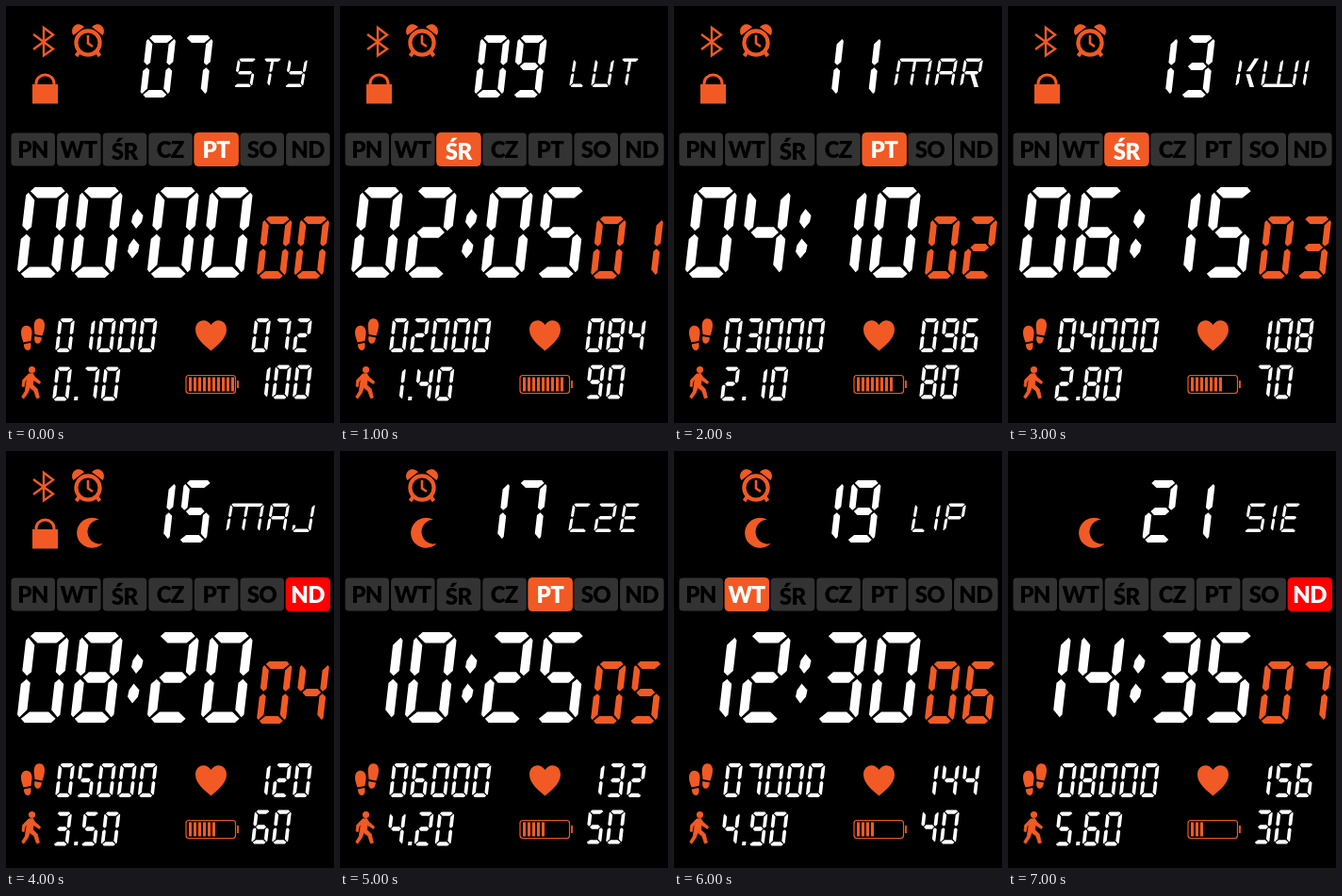
Write an HTML page that moves like this. It is 348x442 px and loops after 8 s.

```html
<!DOCTYPE html>
<html lang="pl">
<head>
<meta charset="utf-8">
<title>Watch face</title>
<style>
html, body { margin: 0; width: 100%; height: 100%; overflow: hidden; background: #000; }
svg { display: block; width: 348px; height: 442px; }
text { font: 900 24px Lato, "Open Sans", sans-serif; text-anchor: middle; letter-spacing: -.6px; }
</style>
</head>
<body>
<svg viewBox="0 0 348 442" xmlns="http://www.w3.org/2000/svg">
  <rect width="348" height="442"/>
  <g fill="none" stroke="#f15a24">
    <path id="bluetooth" stroke-width="2.400" d="M29 30L50 45.500L40 52.500V23L50 30.500L29 46"/>
    <g id="alarm">
      <circle cx="87" cy="39" r="12.600" stroke-width="4.200"/>
      <path stroke-width="2.600" d="M87 31V39.500L92 43"/>
      <path stroke-width="4" d="M78 48L74.500 53M96 48L99.500 53"/>
      <path fill="#f15a24" stroke="none" d="M71.500 31A7 7 0 0 1 83 22.200ZM102.500 31A7 7 0 0 0 91 22.200Z"/>
    </g>
    <g id="lock">
      <path stroke-width="3" d="M32 84V82A9.500 9 0 0 1 51 82V84"/>
      <rect x="28" y="83" width="27" height="20.500" fill="#f15a24" stroke="none"/>
    </g>
    <rect x="191" y="391.500" width="52.500" height="19" rx="3" stroke-width="1.200"/>
    <path stroke-width="1.800" d="M246 397V405"/>
  </g>
  <g fill="#f15a24">
    <path id="moon" d="M99 72.800A16 16 0 1 0 102.500 98A12.800 12.800 0 1 1 99 72.800Z"/>
    <path d="M16 346C16 341 19 338 23 339C27 340 28 344 27.500 348L26.500 355L18.500 356.500C17 352 16 350 16 346ZM18.800 358.500L26.300 357C27 361 26.500 364.500 23.500 365C20.500 365.300 19 362 18.800 358.500Z"/>
    <path d="M41 338C41 333.500 38 330.500 34 331.500C30 332.500 29.500 337 29.800 341L30.500 348L38.500 349.500C40 345.500 41 342 41 338ZM38 351.500L30.500 350C29.500 354 30.500 357 33 357.800C36 358.300 37.700 355 38 351.500Z"/>
    <circle cx="27.500" cy="385.500" r="3.600"/>
    <path stroke="#f15a24" stroke-width=".8" d="M24 390L28.500 389.500L30.500 393L36.700 398.500L35.400 400.500L29 396.500L28.700 401.500L33.200 406L35.400 415L32.500 416L29.700 408L25.200 404.500L23.200 410L18.700 416.200L16.700 414.300L20.200 408.500L22.200 396L20.200 398L19.200 403.500L17 403L17.700 396.500Z"/>
    <path d="M217.500 365.500C211 360 201 352.500 201 343C201 332.500 212.500 330 217.500 338C222.500 330 234 332.500 234 343C234 352.500 224 360 217.500 365.500Z"/>
    <path id="bars"/>
    <path id="seconds"/>
  </g>
  <g id="week"></g>
  <path id="digits" fill="#fff"/>
</svg>
<script>
const $ = id => document.getElementById(id);
const ORANGE = "#f15a24";
const DAYS = ["PN", "WT", "ŚR", "CZ", "PT", "SO", "ND"];
const MONTHS = ["STY", "LUT", "MAR", "KWI", "MAJ", "CZE", "LIP", "SIE"];
const WEEKDAY = [4, 2, 4, 2, 6, 4, 1, 6];
const NUMERALS = ["abcdef", "bc", "abged", "abgcd", "fgbc", "afgcd", "afgedc", "abc", "abcdefg", "abcdfg"];
const LETTERS = {
  S: "afgcd", T: "amn", Y: "fgbcd", L: "fed", U: "bcdef", M: "abcefmn", A: "abcefg",
  R: "abefgr", K: "efkr", W: "bcdefmn", I: "bc", J: "bcdj", C: "adef", Z: "abged", E: "adefg", P: "abefg"
};
const WIDTHS = { L: 16, I: 4, E: 18, M: 36, W: 36 };

// Corner points of every segment in an upright w by h cell; bars are t thick, posts v.
function segments(w, h, t) {
  const m = h / 2, g = t * .16, v = t * .86;
  const b = [[w - v * .25, t * .5], [w, t * .75], [w, m - t * .6], [w - v * .55, m - g], [w - v, m - t * .5], [w - v, t * 1.2]];
  const a = [[t * .38, t * .38], [t * .75, 0], [w - t * .75, 0], [w - t * .38, t * .38], [w - t * 1.1, t], [t * 1.1, t]];
  const flipX = p => p.map(([x, y]) => [w - x, y]);
  const flipY = p => p.map(([x, y]) => [x, h - y]);
  const mid = p => p.map(([x, y]) => [x - (w - v) / 2, y]);
  const c = flipY(b);
  const leg = [[w * .45, m + t * .4], [w * .45 + t * 1.3, m + t * .4], [w, h], [w - t * 1.3, h]];
  return {
    a, b, c, d: flipY(a), e: flipX(c), f: flipX(b),
    g: [[t * .7, m], [t * 1.2, m - t / 2], [w - t * 1.2, m - t / 2], [w - t * .7, m], [w - t * 1.2, m + t / 2], [t * 1.2, m + t / 2]],
    m: mid(b), n: mid(c), r: leg, k: flipY(leg),
    j: [[0, h * .75], [v, h * .75], [v, h - t * 1.3], [v * .25, h - t * .5], [0, h - t * .75]]
  };
}

const poly = pts => "M" + pts.map(p => p.map(n => n.toFixed(2)).join(" ")).join("L") + "Z";

function glyph(parts, x, y, { w, h, t, slant }) {
  const seg = segments(w, h, t);
  return [...parts].map(k => poly(seg[k].map(([px, py]) => [x + px + (h - py) * slant, y + py]))).join("");
}

const BIG = { w: 45.5, h: 96, t: 11.5, slant: .115, step: 57 };
const MEDIUM = { w: 31, h: 66, t: 8, slant: .115, step: 39.5 };
const SMALL = { w: 17, h: 36, t: 4.3, slant: .115, step: 21.9 };
const THIN = { w: 20, h: 30.5, t: 3.5, slant: .17, gap: 7 };

const number = (s, x, y, font) =>
  [...s].map((n, i) => glyph(NUMERALS[n], x + i * font.step, y, font)).join("");

function word(s) {
  const widths = [...s].map(c => WIDTHS[c] || THIN.w);
  let x = 281.5 - widths.reduce((sum, w) => sum + w + THIN.gap, 0) / 2;
  return [...s].map((c, i) => {
    const d = glyph(LETTERS[c], x, 55.5, { ...THIN, w: widths[i] });
    x += widths[i] + THIN.gap;
    return d;
  }).join("");
}

const pad = (n, len) => String(n).padStart(len, "0");
const show = (id, on) => $(id).setAttribute("display", on ? "inline" : "none");
const dot = (x, y) => poly([[x + 6.5, y], [x + 12.5, y + 7], [x + 11, y + 14], [x + 5, y + 21], [x, y + 14], [x + 1.5, y + 7]]);

$("week").innerHTML = DAYS.map((name, i) => {
  const x = 5.5 + i * 48.6;
  return `<rect x="${x}" y="134.5" width="46.5" height="35" rx="4"/>` +
    `<text x="${x + 23}" y="${i === 2 ? 163 : 161}">${name}</text>`;
}).join("");
const boxes = $("week").querySelectorAll("rect");
const labels = $("week").querySelectorAll("text");

function draw(k) {
  const km = pad((k + 1) * 70, 3);
  $("digits").setAttribute("d",
    number(pad(7 + 2 * k, 2), 142, 31, MEDIUM) + word(MONTHS[k]) +
    number(pad(2 * k, 2), 11, 192, BIG) + number(pad(5 * k, 2), 149, 192, BIG) +
    dot(133, 215) + dot(129, 246.5) +
    number(pad((k + 1) * 1000, 5), 52, 331, SMALL) +
    number(pad(72 + 12 * k, 3), 260, 331, SMALL) +
    number(km[0], 49, 382.5, SMALL) + number(km.slice(1), 78.5, 382.5, SMALL) +
    "M72.500 414H76.500L76 418H72Z" +
    number(String(100 - 10 * k), 260, 380.5, SMALL));
  $("seconds").setAttribute("d", number(pad(k, 2), 265.5, 223, MEDIUM));
  $("bars").setAttribute("d",
    Array.from({ length: 10 - k }, (_, i) => `M${194 + i * 5} 393.500h3v15h-3z`).join(""));
  boxes.forEach((box, i) => {
    const on = i === WEEKDAY[k];
    const color = !on ? "#333" : i === 6 ? "#f00" : ORANGE;
    box.setAttribute("fill", color);
    box.setAttribute("stroke", on ? color : "none");
    labels[i].setAttribute("fill", on ? "#fff" : "#000");
  });
  show("bluetooth", k < 5);
  show("lock", k < 5);
  show("alarm", k < 7);
  show("moon", k > 3);
}

let last = -1;
function tick() {
  const k = Math.floor(performance.now() % 8000 / 1000);
  if (k !== last) draw(last = k);
  requestAnimationFrame(tick);
}
tick();
</script>
</body>
</html>
```
